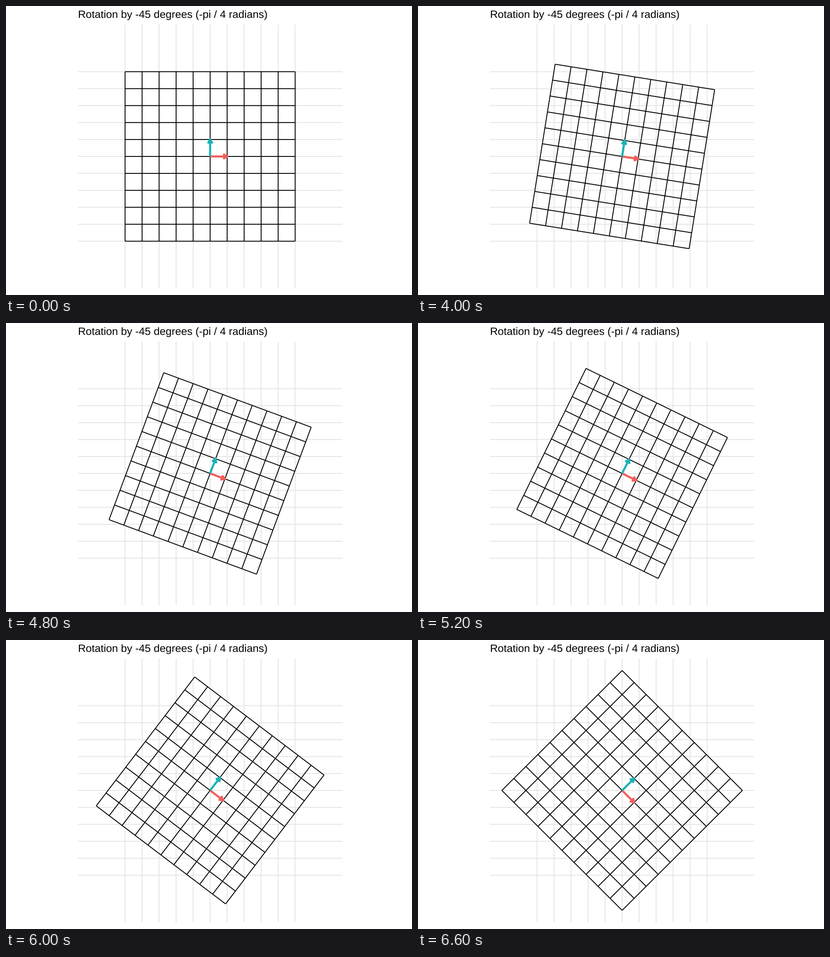
Recreate the animation shown at these times as a matplotlib script. Size 885x632 px, loop 10 s.

```python
import numpy as np
import matplotlib.pyplot as plt
from matplotlib.animation import FuncAnimation
from matplotlib.collections import LineCollection

WIDTH, HEIGHT, DPI = 885, 632, 100
PX = 72 / DPI                        # points per pixel
CENTER = np.array([444.95, 329.0])
UNIT = 37.08                         # pixels per grid cell
PANEL = 288.4                        # half the panel side
THIN, THICK = 1.89, 4.53
HEAD_LENGTH, HEAD_ANGLE = 10.0, np.radians(30)
FRAMES, INTERVAL = 100, 100
HOLD, TWEEN = 33, 33                 # still frames, then moving frames

plt.rcParams["text.hinting"] = "none"


def rotation(angle):
    c, s = np.cos(angle), np.sin(angle)
    return np.array([[c, -s], [s, c]])


END = rotation(-np.pi / 4)


def to_screen(points):
    return CENTER + np.asarray(points) * [UNIT, -UNIT]


def grid_lines(reach):
    """Vertical and horizontal segments at the integers -5 to 5."""
    vertical = [[(k, -reach), (k, reach)] for k in range(-5, 6)]
    horizontal = [[(-reach, k), (reach, k)] for k in range(-5, 6)]
    return np.array(vertical + horizontal, dtype=float)


def arrow_head(tip):
    back = CENTER - tip
    back = back / np.hypot(*back) * HEAD_LENGTH
    wings = [tip + rotation(a) @ back for a in (HEAD_ANGLE, -HEAD_ANGLE)]
    return np.array([wings[0], tip, wings[1]])


fig = plt.figure(figsize=(WIDTH / DPI, HEIGHT / DPI), dpi=DPI, facecolor="white")
ax = fig.add_axes([0, 0, 1, 1])
ax.set(xlim=(0, WIDTH), ylim=(HEIGHT, 0))
ax.axis("off")


def add_lines(segments, color, z):
    lines = LineCollection(to_screen(segments), colors=color, linewidths=THIN * PX,
                           capstyle="butt", zorder=z)
    lines.set_snap(False)
    return ax.add_collection(lines)


def add_stroke(color, z):
    line, = ax.plot([], [], color=color, lw=THICK * PX, solid_capstyle="butt",
                    solid_joinstyle="round", zorder=z)
    line.set_snap(False)
    return line


GRID = grid_lines(5)
add_lines(grid_lines(PANEL / UNIT), "#E5E5E5", 1)
mesh = add_lines(GRID, "black", 2)
arrows = [(basis, add_stroke(color, z), add_stroke(color, z))
          for basis, color, z in (((1, 0), "#F35E5A", 3), ((0, 1), "#17B3B7", 4))]

ax.text(CENTER[0] - PANEL, 26.3, "Rotation by -45 degrees (-pi / 4 radians)",
        family="Liberation Sans", size=23.36 * PX, color="black",
        ha="left", va="baseline")


def update(frame):
    t = np.clip((frame - HOLD) / TWEEN, 0, 1)
    # Points travel straight to their rotated places, so the mesh shrinks midway.
    matrix = (1 - t) * np.eye(2) + t * END
    mesh.set_segments(to_screen(GRID @ matrix.T))
    for basis, shaft, head in arrows:
        tip = to_screen(matrix @ basis)
        shaft.set_data(*np.array([CENTER, tip]).T)
        head.set_data(*arrow_head(tip).T)
    return [mesh]


anim = FuncAnimation(fig, update, frames=FRAMES, interval=INTERVAL,
                     repeat=True, repeat_delay=0, blit=False)
plt.show()
```
